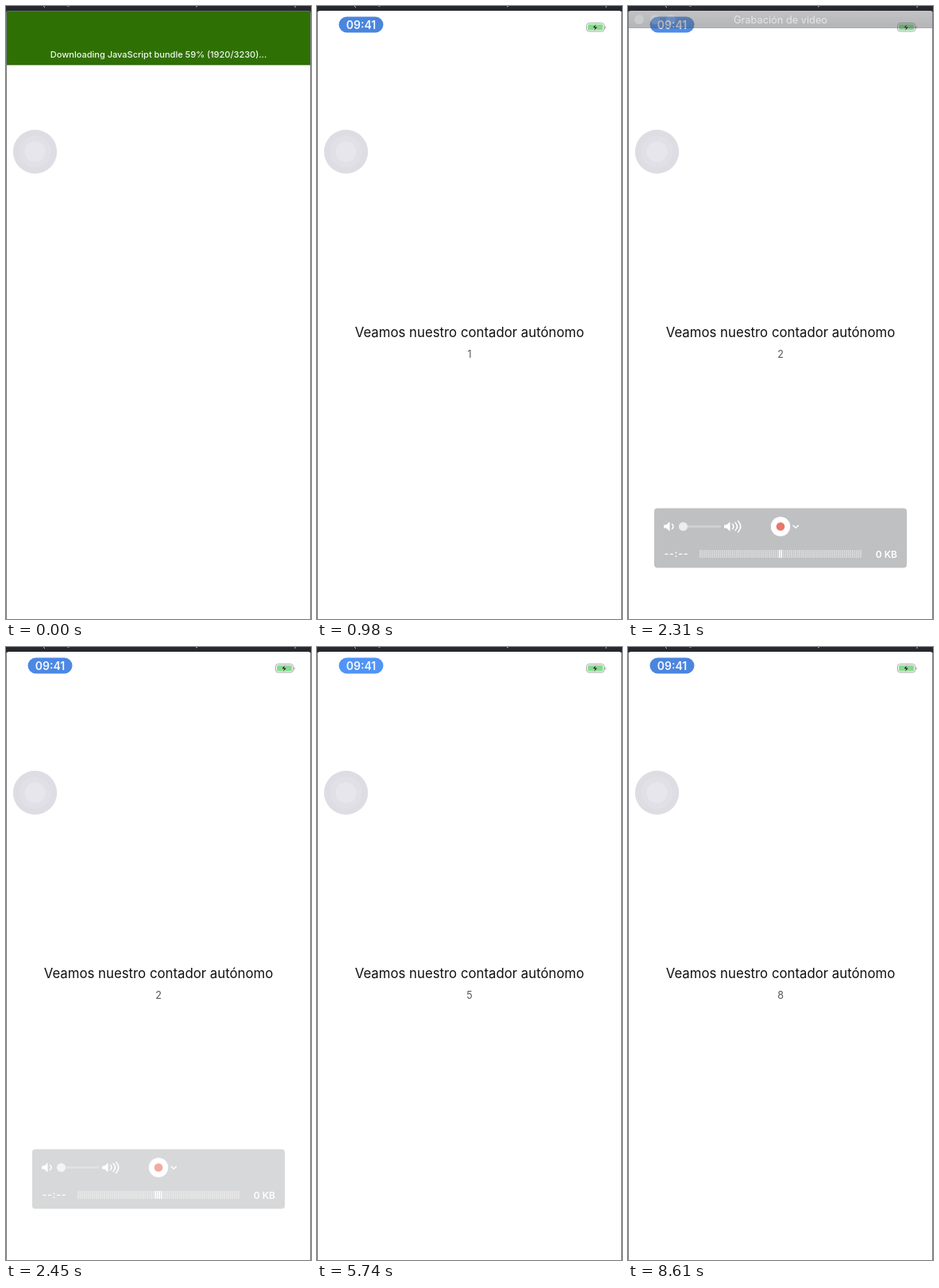
These frames come from a looping animation (384x772 px, 8680 ms). An HTML page:

```html
<!DOCTYPE html>
<html lang="es">
<head>
<meta charset="utf-8">
<style>
html, body { margin: 0; width: 100%; height: 100%; overflow: hidden; background: #26282f; }
svg { display: block; width: 384px; height: 772px; font-family: Inter, "Open Sans", sans-serif; }
.mid { text-anchor: middle; }
.line { fill: none; stroke: #fff; stroke-width: 1.5; stroke-linecap: round; }
</style>
</head>
<body>
<svg viewBox="0 0 384 772">
  <defs>
    <linearGradient id="bar" x2="0" y2="1">
      <stop stop-color="#77797c"/><stop offset="1" stop-color="#595b5e"/>
    </linearGradient>
    <clipPath id="win"><path d="M0 772V10Q0 6 4 6H380Q384 6 384 10V772Z"/></clipPath>
  </defs>
  <rect width="384" height="772" fill="#26282f"/>
  <path d="M47 0l2 2M77 0h3M239 1l2-1M364 0v2" stroke="#b9bbc0"/>

  <g clip-path="url(#win)">
    <rect y="6" width="384" height="766" fill="#fff"/>

    <g id="app">
      <rect id="pill" x="27.5" y="13.5" width="56" height="20" rx="10"/>
      <text class="mid" x="55.5" y="28.5" font-size="14" font-weight="600" fill="#f4f8ff">09:41</text>
      <rect x="339.5" y="21.5" width="22" height="10.5" rx="3" fill="#fff" stroke="#a3a7a3"/>
      <rect x="341" y="23" width="19" height="7.5" rx="1.5" fill="#84dc8c"/>
      <path d="M363 25.5v3" stroke="#a3a7a3" stroke-width="1.2"/>
      <path d="M351.5 22.5L346.8 27.6H349.8L348.7 31.5L353.4 26.2H350.4Z" fill="#111" stroke="#d5f2d8" stroke-width=".5"/>
      <text class="mid" x="192" y="417" font-size="16.8" fill="#111">Veamos nuestro contador autónomo</text>
      <text class="mid" id="count" x="192" y="443" font-size="12.5" fill="#555"></text>
    </g>

    <circle cx="36.5" cy="183.5" r="27.7" fill="#dedde3"/>
    <circle cx="36.5" cy="183.5" r="20" fill="#e1e0e7"/>
    <circle cx="36.5" cy="183.5" r="13" fill="#e7e6ed"/>

    <g id="load">
      <rect y="6" width="384" height="68" fill="#2f7004"/>
      <path d="M0 74H384" stroke="#24550a" stroke-width=".8"/>
      <path d="M3 6.5H381" stroke="#557b45"/>
      <text class="mid" id="progress" x="192" y="65" font-size="11" font-weight="450" fill="#f4f8f1"></text>
    </g>

    <g id="title">
      <rect y="6" width="384" height="22" fill="url(#bar)"/>
      <path d="M0 27.5H384" stroke="#46484b"/>
      <g fill="#8b8d90">
        <circle cx="14" cy="17" r="6"/><circle cx="34" cy="17" r="6"/><circle cx="54" cy="17" r="6"/>
      </g>
      <text class="mid" x="192" y="22" font-size="12.8" fill="#c6c7c9">Grabación de video</text>
    </g>

    <g id="tools">
      <rect x="33" y="632.5" width="318" height="75" rx="4" fill="#adaeb0"/>
      <g fill="#fff">
        <path d="M45 653.5h3l4.5-4v12l-4.5-4h-3zM121 653.5h3l4.5-4v12l-4.5-4h-3z"/>
        <text x="45.5" y="694" font-size="12.5" font-weight="600" letter-spacing=".7">--:--</text>
        <text x="339" y="694.5" font-size="12" font-weight="600" text-anchor="end">0 KB</text>
        <circle cx="192" cy="655.5" r="12.2"/>
      </g>
      <path class="line" d="M55.5 652.5q3 3 0 6M131.5 652.5q3 3 0 6M135 650.5q5 5 0 10M138.5 648.5q6.5 7 0 14M208 654.3l3.2 3 3.2-3"/>
      <path d="M65 655.5H116" stroke="#c5c6c8" stroke-width="2.5" stroke-linecap="round"/>
      <circle cx="69.5" cy="655.5" r="5.5" fill="#e9e9ea"/>
      <circle cx="192" cy="655.5" r="5.3" fill="#e5503f"/>
      <g id="meter"></g>
    </g>
    <path d="M.5 8V772M383.5 8V772" stroke="#77797c"/>
  </g>
</svg>
<script>
const LOOP = 8680, STEP = 70, TICKS = 80, GAP = 2.56;
const $ = id => document.getElementById(id);
const ramp = (t, from, to) => Math.min(1, Math.max(0, (t - from) / (to - from)));
const fade = (id, value) => $(id).setAttribute('opacity', value);

const ticks = Array.from({ length: TICKS }, (_, i) => {
  const r = document.createElementNS('http://www.w3.org/2000/svg', 'rect');
  const attrs = { x: 90 + i * GAP, y: 685, width: 1.6, height: 10, fill: '#fff' };
  for (const k in attrs) r.setAttribute(k, attrs[k]);
  $('meter').append(r);
  return r;
});

function draw(t) {
  // bundle download, then the app mounts under the fading banner
  const done = Math.round(1920 + 1310 * ramp(t, 0, 560));
  $('progress').textContent =
    `Downloading JavaScript bundle ${Math.floor(done / 32.3)}% (${done}/3230)...`;
  fade('load', 1 - ramp(t, 700, 950));
  fade('app', t >= 750 ? 1 : 0);
  $('count').textContent = 1 + Math.max(0, Math.floor((t - 750) / 1000));

  // recording pill breathes once every two seconds
  const glow = (1 + Math.cos((t - 1800) * Math.PI / 1000)) / 2;
  const mix = (a, b) => Math.round(a + (b - a) * glow);
  $('pill').setAttribute('fill', `rgb(${mix(74, 80)},${mix(132, 148)},${mix(220, 246)})`);

  // recorder controls appear and vanish
  const shown = ramp(t, 1050, 1330);
  fade('title', shown * (1 - ramp(t, 2200, 2400)));
  fade('tools', shown * (1 - ramp(t, 2200, 2680)));
  const level = 7.5 + 4.5 * Math.cos((t - 1750) * Math.PI / 560);
  ticks.forEach((r, i) =>
    r.setAttribute('opacity', Math.abs((i + .5 - TICKS / 2) * GAP) < level ? 1 : .42));
}

const start = performance.now();
function frame() {
  const t = Math.max(0, performance.now() - start) % LOOP;
  draw(Math.floor(t / STEP) * STEP);
  requestAnimationFrame(frame);
}
frame();
</script>
</body>
</html>
```
